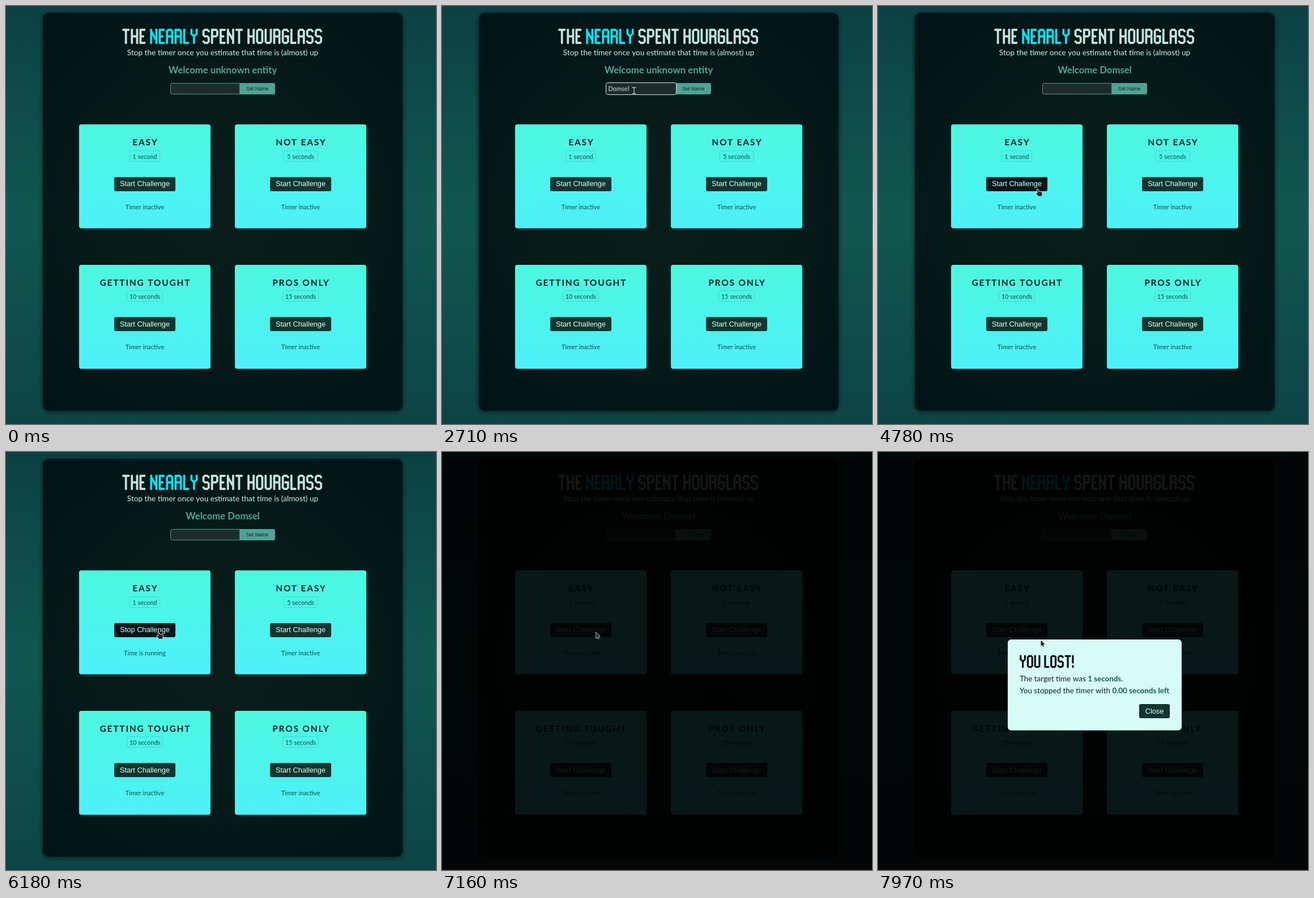
Recreate the animation shown at these times as an HTML page with a canvas. Size 759 by 738 pixels, loop 7990 ms.

```html
<!DOCTYPE html>
<html lang="en">
<head>
<meta charset="utf-8">
<title>Timer challenge</title>
<style>
html, body { margin: 0; width: 100%; height: 100%; overflow: hidden; background: #0c4144; }
canvas { display: block; }
</style>
</head>
<body>
<canvas id="stage" width="759" height="738"></canvas>
<script>
const W = 759, H = 738, LOOP = 7990;
const screen2d = document.getElementById('stage').getContext('2d');
const layer = document.createElement('canvas');
layer.width = W;
layer.height = H;
let ctx = screen2d;

const SANS = 'Lato, "Open Sans", sans-serif';
const ARIAL = '"Liberation Sans", Arial, sans-serif';
const NAME = 'Domsel';
const KEYS = [1650, 1780, 1930, 2020, 2100, 2190];
const FOCUS = 960, BLUR = 3560, SAVED = 3650, START = 6140, OVER = 7150;

// Dotted display letters: polylines of grid points, y in hex
const GLYPHS = {
  A: '0a011030414a 0545', E: '30000a3a 0525', G: '41301001091a3a494525',
  H: '000a 404a 0545', L: '000a3a', N: '000a 404a 0148',
  O: '103041493a1a090110', P: '0a003041443505', R: '0a003041443505 35464a',
  S: '4130100104153546493a1a09', T: '0040 202a', U: '00091a3a4940',
  Y: '0003254340 252a', '!': '0006 090a'
};
const GLYPH_W = { E: 3, L: 3, '!': 0 };

// Pointer stops: time, x, y
const STOPS = [
  [30, 727, 737], [820, 332, 149], [840, 332, 149], [960, 339, 149],
  [2810, 339, 149], [3180, 488, 146], [3490, 449, 149],
  [3880, 449, 149], [4660, 289, 326], [4680, 289, 326], [4960, 271, 318],
  [7850, 271, 318], [7970, 287, 332]
];

const CARDS = [
  { x: 129, y: 209, title: 'EASY', time: '1 second', box: 54 },
  { x: 404, y: 209, title: 'NOT EASY', time: '5 seconds', box: 61 },
  { x: 129, y: 456.5, title: 'GETTING TOUGHT', time: '10 seconds', box: 64 },
  { x: 404, y: 456.5, title: 'PROS ONLY', time: '15 seconds', box: 64 }
];

function box(x, y, w, h, r, fill, stroke, line = 1) {
  ctx.beginPath();
  ctx.roundRect(x, y, w, h, r);
  if (fill) { ctx.fillStyle = fill; ctx.fill(); }
  if (stroke) { ctx.strokeStyle = stroke; ctx.lineWidth = line; ctx.stroke(); }
}

function text(str, x, y, font, color, align = 'center', gap = 0) {
  ctx.font = font;
  ctx.fillStyle = color;
  ctx.textAlign = align;
  ctx.letterSpacing = gap + 'px';
  ctx.fillText(str, x, y);
  const width = ctx.measureText(str).width;
  ctx.letterSpacing = '0px';
  return width;
}

// Draws dotted letters and returns the x where the next word starts
function dotted(str, x, top, scale, color) {
  const step = 2.3 * scale, r = 2.1 * scale;
  ctx.fillStyle = color;
  ctx.beginPath();
  for (const ch of str) {
    if (ch === ' ') { x += 6 * scale; continue; }
    for (const line of GLYPHS[ch].split(' ')) {
      const pts = line.match(/../g).map(p => [+p[0], parseInt(p[1], 16)]);
      for (let i = 1; i < pts.length; i++) {
        const [ax, ay] = pts[i - 1], [bx, by] = pts[i];
        const n = Math.max(Math.abs(bx - ax), Math.abs(by - ay));
        for (let k = 0; k <= n; k++) {
          const px = x + r + (ax + (bx - ax) * k / n) * step;
          const py = top + r + (ay + (by - ay) * k / n) * step;
          ctx.moveTo(px + r, py);
          ctx.arc(px, py, r, 0, 7);
        }
      }
    }
    x += (GLYPH_W[ch] ?? 4) * step + 2 * r + 1.75 * scale;
  }
  ctx.fill();
  return x + 6 * scale;
}

const smooth = p => p * p * (3 - 2 * p);

function pointerAt(t) {
  let i = 0;
  while (i < STOPS.length - 1 && STOPS[i + 1][0] <= t) i++;
  const a = STOPS[i], b = STOPS[i + 1] || a;
  const p = b === a ? 0 : smooth(Math.max(0, (t - a[0]) / (b[0] - a[0])));
  return { x: a[1] + (b[1] - a[1]) * p, y: a[2] + (b[2] - a[2]) * p };
}

const inside = (m, x, y, w, h) => m.x >= x && m.x <= x + w && m.y >= y && m.y <= y + h;

// CSS ease-out curve
function easeOut(x) {
  let lo = 0, hi = 1;
  for (let i = 0; i < 24; i++) {
    const s = (lo + hi) / 2;
    if (1.74 * s * s - 0.74 * s * s * s < x) lo = s; else hi = s;
  }
  return smooth(lo);
}

function backdrop() {
  let g = ctx.createLinearGradient(0, 0, 0, H);
  g.addColorStop(0, '#0c4144');
  g.addColorStop(0.5, '#115750');
  g.addColorStop(1, '#0d4446');
  ctx.fillStyle = g;
  ctx.fillRect(0, 0, W, H);
  g = ctx.createRadialGradient(382, 363, 0, 382, 363, 473);
  g.addColorStop(0, '#0a1d19');
  g.addColorStop(0.45, '#071b19');
  g.addColorStop(1, '#011316');
  ctx.save();
  ctx.shadowColor = 'rgba(0,0,0,.6)';
  ctx.shadowBlur = 8;
  ctx.shadowOffsetY = 1.5;
  box(65, 12, 635, 702.5, 11, g);
  ctx.restore();
}

function header(t, mouse) {
  let x = dotted('THE', 205, 40, 1, '#c3e3da');
  x = dotted('NEARLY', x, 40, 1, '#00e6fc');
  dotted('SPENT HOURGLASS', x, 40, 1, '#c3e3da');
  text('Stop the timer once you estimate that time is (almost) up', 382.5, 87, '13.6px ' + SANS, '#c4f2ea');
  const who = t < SAVED ? 'unknown entity' : NAME;
  text('Welcome ' + who, 382.5, 119, 'bold 16.7px ' + SANS, '#51a497');

  const focused = t >= FOCUS && t < BLUR;
  const hot = inside(mouse, 413, 136, 62, 20);
  box(412.5, 136, 62.5, 20, [0, 3, 3, 0], hot ? '#3e8277' : '#50a296');
  text('Set Name', 443.7, 149.3, '8.9px ' + ARIAL, '#0a2722');
  box(290.5, 136.5, 122, 19, [3, 0, 0, 3], '#1d2c2b', focused ? '#16211f' : '#4c9f93');
  if (focused) box(289.5, 135.5, 124, 21, 3, null, '#e6efed');
  if (t < SAVED) {
    const typed = NAME.slice(0, KEYS.filter(k => k <= t).length);
    const width = text(typed, 293.5, 150.2, '11px ' + SANS, '#cbe3de', 'left');
    if (focused) {
      const last = KEYS.filter(k => k <= t).pop() || FOCUS;
      if (Math.floor((t - last) / 510) % 2 === 0) {
        ctx.fillStyle = '#cbe3de';
        ctx.fillRect(Math.round(293 + width), 139, 1, 14);
      }
    }
  }
}

function card(c, running, hot, pulse) {
  const { x, y } = c, top = Math.round(y), mid = x + 116;
  const g = ctx.createLinearGradient(0, top, 0, top + 183.5);
  g.addColorStop(0, '#4cf8df');
  g.addColorStop(1, '#4df0f9');
  box(x, top, 232, 183.5, 4, g);
  text(c.title, mid + 0.9, y + 37, 'bold 15.5px ' + SANS, '#08201f', 'center', 1.8);
  box(mid - c.box / 2 + 0.5, Math.floor(y + 46) + 0.5, c.box - 1, 19, 3, null, '#40d6cd');
  text(c.time, mid, y + 60.5, '11px ' + SANS, '#174a48');
  box(x + 62, Math.round(y + 92.5), 108, 25, 3, hot ? '#04161a' : '#12352f');
  text((running ? 'Stop' : 'Start') + ' Challenge', mid, y + 109.3, '12.8px ' + ARIAL, '#e0fef9');
  ctx.globalAlpha = pulse;
  text(running ? 'Time is running' : 'Timer inactive', mid, y + 149.7, '11px ' + SANS, '#174a48');
  ctx.globalAlpha = 1;
}

function resultLine(plain, strong, y) {
  const font = '13.4px ' + SANS;
  const width = text(plain + ' ', 250, y, font, '#0c2421', 'left');
  text(strong, 250 + width, y, 'bold ' + font, '#145f57', 'left');
}

// The dialog is painted once so that it can fade as a whole
function paintDialog() {
  ctx = layer.getContext('2d');
  box(229, 331, 307, 160.5, 6, '#d7fcf7');
  dotted('YOU LOST!', 250, 358.5, 0.84, '#070d0d');
  resultLine('The target time was', '1 seconds.', 405);
  resultLine('You stopped the timer with', '0.00 seconds left', 426);
  box(461, 445, 54, 25, 3, '#12352f');
  text('Close', 488, 462, '12.8px ' + ARIAL, '#e0fef9');
  ctx = screen2d;
}

function dialog(t) {
  ctx.fillStyle = 'rgba(0,0,0,.9)';
  ctx.fillRect(0, 0, W, H);
  const p = easeOut(Math.min(1, Math.max(0, (t - OVER - 10) / 400)));
  ctx.globalAlpha = p;
  ctx.drawImage(layer, 0, p > 0.999 ? 0 : -24 * (1 - p));
  ctx.globalAlpha = 1;
}

function shape(path, line) {
  const s = new Path2D(path);
  ctx.lineJoin = 'round';
  ctx.strokeStyle = '#dde2e1';
  ctx.lineWidth = line;
  ctx.stroke(s);
  ctx.fillStyle = '#222828';
  ctx.fill(s);
}

function pointer(m, kind) {
  ctx.save();
  ctx.translate(m.x, m.y);
  if (kind === 'beam') {
    const bar = new Path2D('M-3.5 -5H-1L0 -4L1 -5H3.5M0 -4V5M-3.5 6H-1L0 5L1 6H3.5');
    ctx.strokeStyle = '#0b1413';
    ctx.lineWidth = 2.6;
    ctx.stroke(bar);
    ctx.strokeStyle = '#c9d2d0';
    ctx.lineWidth = 1.3;
    ctx.stroke(bar);
  } else if (kind === 'hand') {
    shape('M-2.8 .2Q-2 -.6 -1.2 .2L-.5 4L1.6 3.8L3.6 4.4L5.6 5.4Q6.4 7 5.8 9L5 12H-.6L-4.6 7.6Q-4.6 6.3 -3 6.7L-2 7.4Z', 1.8);
  } else {
    shape('M.5 .5V10.5L2.8 8.4L4.4 12L6 11.2L4.4 7.8H7.6Z', 1.3);
  }
  ctx.restore();
}

function draw(t) {
  const mouse = pointerAt(t);
  const over = t >= OVER;
  const running = t >= START && !over;
  const pulse = running ? 0.5 + 0.5 * Math.cos((t - START) / 1000 * 2 * Math.PI) : 1;
  const onStart = c => !over && inside(mouse, c.x + 62, c.y + 92.5, 108, 25);

  ctx.clearRect(0, 0, W, H);
  backdrop();
  header(t, mouse);
  CARDS.forEach((c, i) => card(c, running && i === 0, onStart(c), i === 0 ? pulse : 1));
  if (over) dialog(t);

  if (t < 30) return;
  let kind = 'arrow';
  if (!over) {
    if (inside(mouse, 290, 136, 122, 20)) kind = 'beam';
    else if (inside(mouse, 413, 136, 62, 20) || CARDS.some(onStart)) kind = 'hand';
  }
  pointer(mouse, kind);
}

paintDialog();
const begin = performance.now();
function frame() {
  draw((performance.now() - begin) % LOOP);
  requestAnimationFrame(frame);
}
frame();
</script>
</body>
</html>
```
